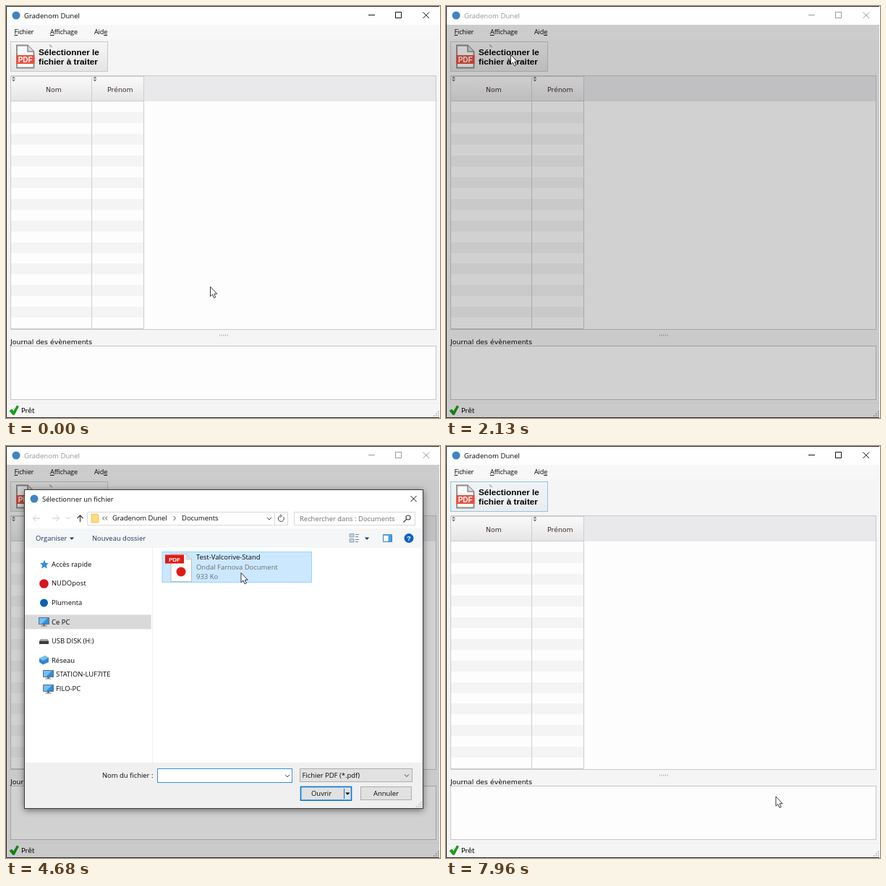
Animation, 600 px wide and 570 px high, one loop 8000 ms. Source, as an HTML page:

```html
<!DOCTYPE html>
<html lang="fr">
<head>
<meta charset="utf-8">
<title>Gradenom Dunel</title>
<style>
html, body { margin: 0; width: 100%; height: 100%; overflow: hidden; background: #f5f5f5; }
svg { display: block; width: 100vw; height: 100vh; }
text { font: 9.45px "Open Sans", "Noto Sans", sans-serif; fill: #080808; white-space: pre; }
.qt text { font: 9.4px "DejaVu Sans", sans-serif; }
.menu text { font-size: 9.2px; letter-spacing: -.2px; }
.u { text-decoration: underline; }
.big text { font: bold 11.8px "Liberation Sans", Arial, sans-serif; fill: #000; }
.mid { text-anchor: middle; }
.grey { fill: #6d6d6d; }
.navy { fill: #1e395b; }
text.tag { font: bold 8px "Liberation Sans", Arial, sans-serif; fill: #fff; text-anchor: middle; }
.line { fill: none; stroke: #444; }
.panel { filter: drop-shadow(0 2px 5px rgba(0, 0, 0, .5)); }
</style>
</head>
<body>
<svg viewBox="0 0 600 570">
  <defs>
    <linearGradient id="face" x2="0" y2="1"><stop stop-color="#f6f6f6"/><stop offset="1" stop-color="#e4e4e5"/></linearGradient>
    <linearGradient id="head" x2="0" y2="1"><stop stop-color="#fafafa"/><stop offset="1" stop-color="#e5e5e6"/></linearGradient>
    <linearGradient id="blue" x2="0" y2="1"><stop stop-color="#c6dfe9"/><stop offset="1" stop-color="#accbd8"/></linearGradient>
    <g id="sort" fill="#777"><path d="M-2.5-.7L0-3.5 2.5-.7zM-2.5.7L0 3.5 2.5.7z"/></g>
    <g id="pc">
      <path d="M-7-5.5H7V3.5H-7z" fill="#2f8fdc" stroke="#5d6f7c"/>
      <path d="M-6.5-5H5L-3 3H-6.5z" fill="#6fc0f5"/>
      <path d="M-1.5 4H1.5V5.5H4V6.5H-4V5.5H-1.5z" fill="#6b7780"/>
    </g>
    <path id="down" class="line" d="M-3-1.7L0 1.5 3-1.7"/>
    <path id="tri" d="M-3.2-1.6H3.2L0 1.8z"/>
  </defs>

  <!-- main window -->
  <rect width="600" height="570" fill="#f5f5f5"/>
  <rect width="600" height="26" fill="#fefefe"/>
  <rect y="26" width="600" height="20" fill="#f7f7f8"/>
  <circle cx="14" cy="13" r="5.5" fill="#3f83c4"/>
  <g id="caption">
    <text x="25" y="16.5" style="font-size:9.6px">Gradenom Dunel</text>
    <path class="line" style="stroke:#111" d="M501 12.5H510M538.5 8.5H546.5V16.5H538.5zM576.5 8.5L585 17M585 8.5L576.5 17"/>
  </g>
  <g class="menu">
    <text x="11.5" y="39"><tspan class="u">F</tspan>ichier</text>
    <text x="61" y="39"><tspan class="u">A</tspan>ffichage</text>
    <text x="122" y="39">Aid<tspan class="u">e</tspan></text>
  </g>

  <rect x="6.5" y="49.5" width="134" height="41" fill="url(#face)" stroke="#c9c9cc"/>
  <rect id="btnHot" x="6.5" y="49.5" width="134" height="41" fill="url(#blue)" stroke="#9fc2d1"/>
  <rect id="btnFocus" x="6.5" y="49.5" width="134" height="41" fill="#eef4f7" fill-opacity=".6" stroke="#97c3da"/>
  <path d="M15 54.5H30L38.5 63V85.5H15z" fill="#fbfbfb" stroke="#8b8b8b" stroke-width="1.8"/>
  <path d="M30 54.5V63H38.5" fill="#ddd" stroke="#8b8b8b" stroke-width="1.5"/>
  <rect x="14" y="68" width="25.5" height="12" fill="#e6513f"/>
  <text class="tag" x="26.7" y="77.7" style="font-size:10px">PDF</text>
  <path d="M59.5 53Q63 53.5 64.5 57.5Q60.5 57 59.5 53" fill="#b5b5b5"/>
  <g class="big"><text x="45" y="67.7">Sélectionner le</text><text x="45" y="81">fichier à traiter</text></g>

  <rect x="6.5" y="96.5" width="588" height="351" fill="#fdfdfd" stroke="#c9c9ce"/>
  <rect x="190" y="97" width="404" height="35" fill="#e9e9eb"/>
  <g id="stripes" fill="#f4f4f4"></g>
  <rect x="7" y="97" width="183" height="35" fill="url(#head)"/>
  <rect id="headHot" x="7" y="97" width="112" height="35" fill="url(#blue)"/>
  <path class="line" style="stroke:#cdcdd3" d="M118.5 97V447M190.5 97V447M7 131.5H190M7 446.5H190M7 97.5H190"/>
  <use href="#sort" x="10.5" y="101"/><use href="#sort" x="123" y="101"/>
  <g class="qt">
    <text x="55" y="118.5" style="fill:#43302e">Nom</text>
    <text x="140" y="118.5" style="fill:#43302e">Prénom</text>
    <text x="6" y="468">Journal des évènements</text>
    <text x="21" y="562.5">Prêt</text>
  </g>
  <path d="M295 455.5H307" stroke="#aaa" stroke-width="2" stroke-dasharray="1 1.7"/>
  <rect x="6.5" y="470.5" width="588" height="74" fill="#fdfdfd" stroke="#c6c6ca"/>
  <path d="M1 549.5H599" stroke="#ededed"/>
  <path d="M5 560L8 558 10.5 561 15 553 17.5 554 11.5 565.5H9.5z" fill="#12a312" stroke="#0b7a0b" stroke-width=".6"/>
  <path d="M591 567H599M594 564H599M597 561H599" stroke="#a5a5a5" stroke-width="1.5" stroke-dasharray="1.5 1.5"/>
  <rect id="dim" x="1" y="26" width="598" height="543" fill="#000"/>
  <path class="line" style="stroke:#252525" d="M599 .5H.5V569.5H599"/>
  <rect x="599" width="1" height="570" fill="#fff"/>

  <!-- file dialog -->
  <g id="dialog">
    <rect class="panel" x="25.5" y="60.5" width="551" height="441" fill="#fff" stroke="#3a3a3a"/>
    <circle cx="39" cy="73" r="5.5" fill="#3f83c4"/>
    <text x="50" y="77">Sélectionner un fichier</text>
    <path class="line" style="stroke:#111" d="M559.5 69L567.5 77M567.5 69L559.5 77"/>

    <path class="line" style="stroke:#c8c8c8" d="M47 100H37.5M41.5 96L37.5 100 41.5 104M64 100H73.5M69.5 96L73.5 100 69.5 104M83.5 98.5L86 101 88.5 98.5"/>
    <path class="line" d="M102.5 105V96M98.5 100L102.5 96 106.5 100" stroke-width="1.3"/>
    <path class="line" style="stroke:#d9d9d9" d="M112.5 91.5H389.5V109.5H112.5zM371.5 92V109M398.5 91.5H565.5V109.5H398.5z"/>
    <path d="M118 94H126L128 96V106H118z" fill="#fbdb7b" stroke="#e5b94d" stroke-width=".7"/>
    <path class="line" d="M136 97.5L133.5 100 136 102.5M140 97.5L137.5 100 140 102.5"/>
    <text x="147" y="103">Gradenom Dunel</text>
    <path class="line" d="M231.5 97L234.5 100 231.5 103"/>
    <text x="243" y="103">Documents</text>
    <use href="#down" x="364" y="100.5"/>
    <path class="line" d="M383.5 98A4 4 0 1 1 379.5 96.5M379 94.5L381.5 96.7 379 98.5"/>
    <text class="grey" x="406" y="103.5">Rechercher dans : Documents</text>
    <path class="line" d="M553.5 101.5L549.5 105.5M553 99a3 3 0 1 1 6 0a3 3 0 1 1-6 0" stroke-width="1.2"/>

    <rect x="26" y="114" width="550" height="27" fill="#f5f6f7"/>
    <text class="navy" x="41" y="131">Organiser</text>
    <use href="#tri" x="91" y="128" fill="#1e395b"/>
    <text class="navy" x="119" y="131">Nouveau dossier</text>
    <path d="M475 121.5H481V126H475zM475 128.5H481V133H475z" fill="#bcd6e8" stroke="#7d8b96" stroke-width=".7"/>
    <path class="line" style="stroke:#7d8b96" d="M483 122.5H488M483 125.5H487M483 129.5H488M483 132.5H487"/>
    <use href="#tri" x="499" y="128" fill="#1e395b"/>
    <path d="M521.5 122.5H533.5V132.5H521.5z" fill="#fff" stroke="#3a7fc1"/>
    <path d="M528.5 123H533V132H528.5zM521 122H534V124H521z" fill="#4b9fe0"/>
    <circle cx="557" cy="127.5" r="6.5" fill="#0d62c4"/>
    <text class="tag" x="557" y="131" style="font-size:9.5px">?</text>

    <rect x="26" y="233.5" width="174.6" height="19.8" fill="#d9d9d9"/>
    <rect id="rowHot" x="26" y="154" width="175" height="19" fill="#e5f3ff"/>
    <path d="M202.5 141V438" stroke="#f0f0f0"/>
    <g id="chevrons" class="line" style="stroke:#aaa"></g>
    <g id="tree"></g>
    <path d="M53 157.5L54.7 161.8 59 162.2 55.8 165 56.8 169.5 53 167.2 49 169.5 50.2 165 47 162.2 51.3 161.8z" fill="#2f8fdd"/>
    <circle cx="52.5" cy="190.5" r="6.3" fill="#d9141c"/>
    <circle cx="52.5" cy="217" r="5.5" fill="#0a62b4"/>
    <use href="#pc" x="52.5" y="243"/>
    <path d="M46 270L48.5 267H57L59 270V274H46z" fill="#3c3f42"/>
    <path d="M46.5 269.7L48.7 267H56.8L58.5 269.7z" fill="#a9adb0"/>
    <path d="M46 294L54 290 59 293V299L51 302.5 46 299z" fill="#2f86cc"/>
    <path d="M46 294L54 290 59 293 51 297z" fill="#78c0ee"/>
    <use href="#pc" x="58.5" y="316"/><use href="#pc" x="58.5" y="336"/>

    <rect id="item" x="216" y="146.5" width="206.5" height="42"/>
    <path d="M228 149.5H249L256.5 157V187.5H228z" fill="#fdfdfd" stroke="#bdbdbd"/>
    <path d="M249 149.5V157H256.5z" fill="#e2e2e2" stroke="#bdbdbd" stroke-width=".7"/>
    <rect x="220" y="150.5" width="26" height="12" fill="#e01a14"/>
    <text class="tag" x="233" y="159.5">PDF</text>
    <circle cx="242" cy="174" r="6.5" fill="#e01a14"/>
    <text x="263" y="157">Test-Valcorive-Stand</text>
    <text class="grey" x="263" y="170.5">Ondal Farnova Document</text>
    <text class="grey" x="263" y="183.5">933 Ko</text>

    <rect x="26" y="438" width="550" height="63" fill="#f0f0f0"/>
    <text x="133" y="459">Nom du fichier :</text>
    <rect x="209.5" y="446.5" width="186" height="19" fill="#fff" stroke="#8a8a8a"/>
    <rect id="ring" x="209.5" y="446.5" width="186" height="19" fill="none" stroke="#3393dd"/>
    <use href="#down" x="389" y="456.5"/>
    <rect id="caret" x="212" y="450" width="1" height="13"/>
    <text id="fileName" x="212" y="459.5">Test-Valcorive-Stand</text>
    <rect x="406.5" y="446.5" width="155" height="18" fill="#e1e1e1" stroke="#adadad"/>
    <rect id="comboHot" x="406.5" y="446.5" width="155" height="18" fill="#e5f1fb" stroke="#0078d7"/>
    <text x="409.5" y="459">Fichier PDF (*.pdf)</text>
    <use href="#down" x="554" y="456"/>
    <rect x="408" y="472" width="69" height="18" fill="#e1e1e1"/>
    <rect id="openHot" x="408" y="472" width="69" height="18" fill="#e5f1fb"/>
    <rect id="openDown" x="408" y="472" width="59" height="18" fill="#cce4f7"/>
    <rect x="407.5" y="471.5" width="70" height="18.7" fill="none" stroke="#0078d7" stroke-width="1.6"/>
    <path d="M467.5 474V488" stroke="#0078d7"/>
    <use href="#tri" x="472.3" y="481"/>
    <text class="mid" x="436" y="484">Ouvrir</text>
    <rect x="490.5" y="471.5" width="70" height="18" fill="#e1e1e1" stroke="#adadad"/>
    <text class="mid" x="525.5" y="484">Annuler</text>
    <path d="M567 499H575M570 496H575M573 493H575" stroke="#b5b5b5" stroke-width="1.5" stroke-dasharray="1.5 1.5"/>
  </g>

  <path id="cursor" d="M0 0V13.2L3 10.5 5 15.3 7.3 14.3 5.3 9.7H9.2z" fill="#fff" stroke="#222" stroke-width=".9"/>
</svg>

<script>
const $ = id => document.getElementById(id);
const LOOP = 8000;

let stripes = '';
for (let i = 1; i < 21; i += 2) {
  const y = Math.round(132.3 + i * 14.94);
  stripes += `<rect x="7" y="${y}" width="183" height="15"/>`;
}
$('stripes').innerHTML = stripes;

const rows = [
  ['Accès rapide', 163.5], ['NUDOpost', 190], ['Plumenta', 217], ['Ce PC', 243.5],
  ['USB DISK (H:)', 270], ['Réseau', 296.5], ['STATION-LUF7ITE', 316, 6], ['FILO-PC', 336, 6]
];
$('tree').innerHTML = rows.map(([s, y, dx = 0]) => `<text x="${63 + dx}" y="${Math.floor(y + 3.5)}">${s}</text>`).join('');
$('chevrons').innerHTML = rows.map(([s, y, dx = 0]) => s === 'Réseau'
  ? `<path d="M31 ${y - 1.5}l3 3 3-3"/>`
  : `<path d="M${33 + dx} ${y - 3}l3 3-3 3"/>`).join('');

// pointer path: time, x, y
const path = [
  [0, 282.5, 388.5], [510, 282.5, 388.5], [1310, 90, 77], [1390, 89.5, 67.5], [3130, 89.5, 67.5],
  [3390, 185, 172], [3620, 293.5, 203], [3930, 324, 178], [4000, 325, 175.5], [5650, 325, 175.5],
  [5760, 317.5, 240], [5960, 387, 408.5], [6200, 445, 478], [6440, 456, 489], [6540, 456, 485],
  [LOOP, 456, 485]
];
const slope = (i, k) => (path[i + 1][k] - path[i][k]) / (path[i + 1][0] - path[i][0]);
function tangent(i, k) {
  if (i === 0 || i === path.length - 1) return 0;
  const a = slope(i - 1, k), b = slope(i, k);
  return a * b > 0 ? 2 * a * b / (a + b) : 0;
}
// monotone cubic between the path points
function along(t, k) {
  let i = 0;
  while (i < path.length - 2 && t >= path[i + 1][0]) i++;
  const p = path[i], q = path[i + 1], h = q[0] - p[0], u = (t - p[0]) / h, v = 1 - u;
  return p[k] * (1 + 2 * u) * v * v + q[k] * u * u * (3 - 2 * u)
    + h * u * v * (tangent(i, k) * v - tangent(i + 1, k) * u);
}

const ramp = (t, a, b) => Math.min(1, Math.max(0, (t - a) / (b - a)));
const pulse = (t, a, b, c, d) => ramp(t, a, b) - ramp(t, c, d);
const within = (t, a, b) => t >= a && t < b ? 1 : 0;
const fade = (id, v) => $(id).setAttribute('opacity', v);

function itemLook(t, over) {
  if (t >= 7680) return ['#d9d9d9', 'none'];
  if (t >= 4680) return ['#cce8ff', '#99d1ff'];
  return [over ? '#e5f3ff' : 'none', 'none'];
}

function draw(t) {
  const x = along(t, 1), y = along(t, 2);
  const shown = pulse(t, 2190, 2470, 7785, 7900);
  const size = .94 + .06 * (1 - (1 - shown) ** 2);

  $('cursor').setAttribute('transform', `translate(${x.toFixed(1)} ${y.toFixed(1)})`);
  fade('caption', within(t, 1890, 7880) ? .42 : 1);
  fade('dim', .175 * pulse(t, 1880, 2120, 7810, 7950));
  fade('btnHot', pulse(t, 1330, 1480, 1880, 2100));
  fade('btnFocus', within(t, 7900, LOOP));
  fade('headHot', .6 * within(t, 1120, 1340));

  $('dialog').style.display = shown > 0 ? '' : 'none';
  fade('dialog', shown);
  $('dialog').setAttribute('transform', `translate(301 281) scale(${size}) translate(-301 -281)`);
  fade('rowHot', within(t, 3130, 3700) && x < 201 && y > 154 && y < 173 ? 1 : 0);
  fade('chevrons', pulse(t, 3280, 3400, 3480, 3760));

  const [fill, edge] = itemLook(t, x > 216 && x < 423 && y > 146 && y < 188);
  $('item').setAttribute('fill', fill);
  $('item').setAttribute('stroke', edge);

  fade('caret', t < 4680 && Math.floor((t - 2330) / 530) % 2 === 0 ? 1 : 0);
  fade('ring', 1 - ramp(t, 4680, 5000));
  fade('fileName', within(t, 4720, LOOP));
  fade('comboHot', pulse(t, 6070, 6150, 6300, 6790));
  fade('openHot', ramp(t, 6250, 6790));
  fade('openDown', within(t, 7680, LOOP));
}

const start = performance.now();
function tick() {
  draw((performance.now() - start) % LOOP);
  requestAnimationFrame(tick);
}
tick();
</script>
</body>
</html>
```
